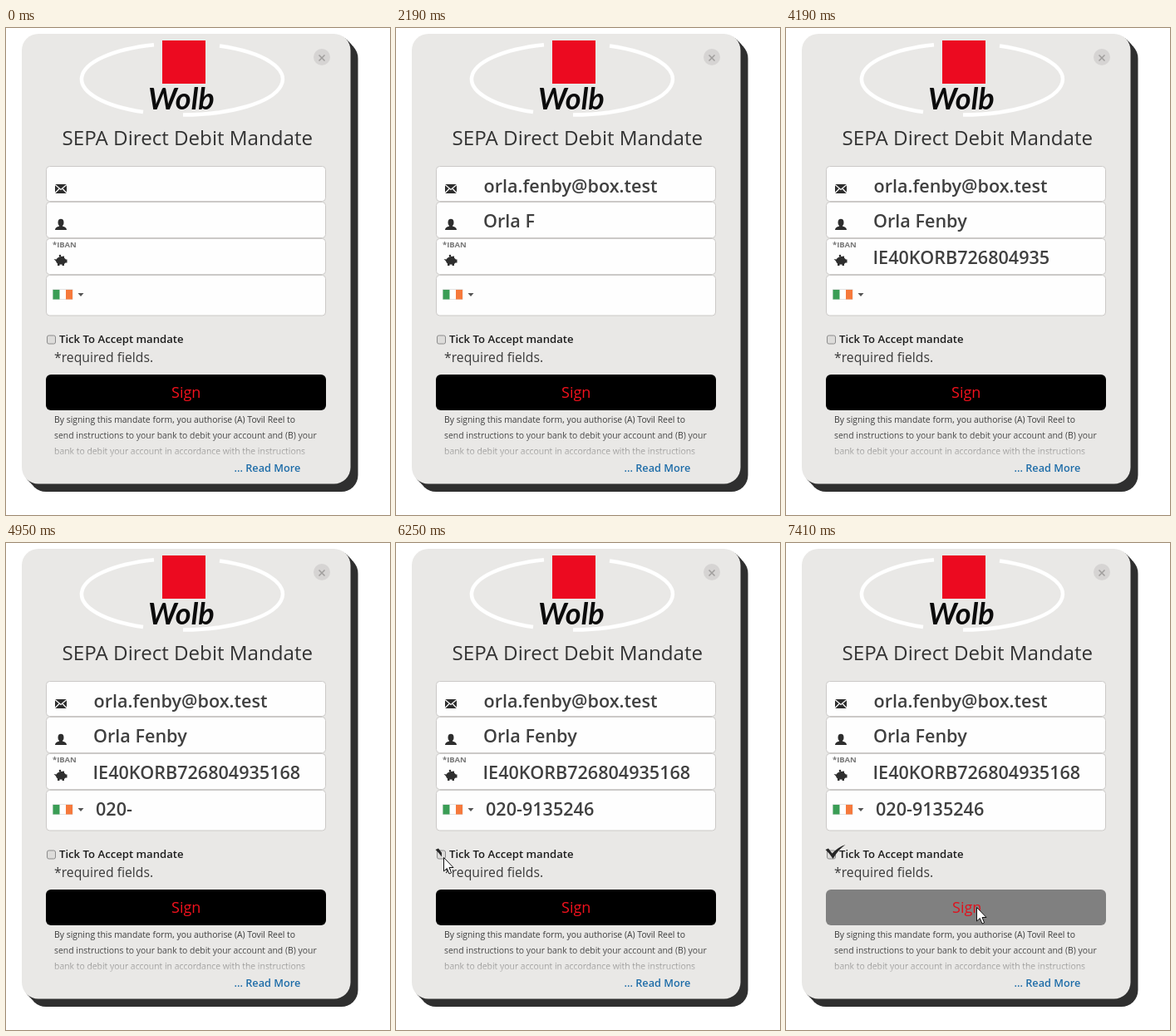
Write an HTML page that moves like this. It is 462 px wide and 586 px high and loops after 8000 ms.

```html
<!DOCTYPE html>
<html lang="en">
<head>
<meta charset="utf-8">
<title>SEPA Direct Debit Mandate</title>
<style>
  html, body { margin: 0; width: 100%; height: 100%; overflow: hidden; background: #fff; }
  svg { display: block; width: 462px; height: 586px; }
  text { font-family: "Open Sans", "Noto Sans", sans-serif; fill: #3a3a3a; }
  .title { font-size: 24.15px; fill: #333; }
  .field { fill: #fefefe; stroke: #cbc9c7; }
  .icon { fill: #2e2e2e; }
  .typed { font-size: 21.6px; font-weight: 600; fill: #404040; }
  .label { font-size: 9.5px; font-weight: 700; fill: #777; }
  .tickLabel { font-size: 13.15px; font-weight: 600; fill: #1c1c1c; }
  .note { font-size: 15.75px; }
  .sign { font-size: 18px; fill: #f3121d; }
  .terms { font-size: 10.42px; fill: #3c3c3c; }
  .more { font-size: 12.7px; font-weight: 600; fill: #1d6ca8; }
  .brand { font: italic 700 36px Lato, "Open Sans", sans-serif; fill: #0b0b0b; }
</style>
</head>
<body>
<svg viewBox="0 0 462 586">
  <defs>
    <linearGradient id="fade" x1="0" y1="0" x2="0" y2="1">
      <stop offset="0" stop-color="#e9e8e6" stop-opacity="0"/>
      <stop offset="1" stop-color="#e9e8e6"/>
    </linearGradient>
    <clipPath id="reveal"><rect id="revealBox" x="46" y="360" width="0" height="24"/></clipPath>
    <rect id="card" x="19" y="7" width="395.5" height="541.5" rx="20"/>
  </defs>

  <g fill="#2f2f2f">
    <use href="#card" x="2" y="2"/>
    <use href="#card" x="4" y="4"/>
    <use href="#card" x="6" y="6"/>
    <use href="#card" x="9" y="9.5"/>
  </g>
  <use href="#card" fill="#e9e8e6"/>

  <path d="M178 20.2A121 43 0 0 0 165 101.1M213 104.5A121 43 0 0 0 257 21.6" fill="none" stroke="#fff" stroke-width="4.5"/>
  <rect x="188" y="15" width="52" height="52" fill="#ec0a20"/>
  <text class="brand" x="171" y="98">Wolb</text>

  <circle cx="380" cy="35" r="10" fill="#d6d4d3"/>
  <path d="M376.5 32.5l7 7m0-7l-7 7" stroke="#a09e9d" stroke-width="1.5"/>

  <text class="title" x="67.5" y="140.5">SEPA Direct Debit Mandate</text>

  <g class="field">
    <rect x="48.5" y="166.5" width="336" height="42" rx="4"/>
    <rect x="48.5" y="209.5" width="336" height="43" rx="4"/>
    <rect x="48.5" y="253.5" width="336" height="43" rx="4"/>
    <rect x="48.5" y="297.5" width="336" height="48.5" rx="4"/>
  </g>

  <g class="icon">
    <rect x="59" y="188" width="14" height="11"/>
    <path d="M59 188.5l7 6 7-6M59 198.5l5-5m9 5l-5-5" fill="none" stroke="#fff" stroke-width="1.2"/>
    <ellipse cx="66" cy="234" rx="3.5" ry="4.3"/>
    <path d="M64 236h4v2.5q5 1 5 4.5H59q0-3.5 5-4.5z"/>
    <path d="M57.5 278l3 .5q2-3.5 6-3.5l3.5-.5v2l2 2h1.5v4h-2l-1.5 1.5v2h-2.500v-1.5h-3v1.5H62v-2.5q-1.5-1-2-3z"/>
    <circle cx="65" cy="274" r="1.3"/>
  </g>
  <text class="label" x="56" y="264">*IBAN</text>

  <rect x="56.5" y="314.5" width="23.5" height="12" fill="#fff" stroke="#e2e2e2"/>
  <rect x="56.5" y="315" width="8" height="11.5" fill="#3a9d55"/>
  <rect x="72" y="315" width="8" height="11.5" fill="#f6793c"/>
  <path d="M86.5 319h7l-3.5 4z" fill="#555"/>

  <text class="typed" id="mail" x="105.5" y="198"></text>
  <text class="typed" id="name" x="105" y="240"></text>
  <text class="typed" id="iban" x="104.5" y="283.5"></text>
  <text class="typed" id="phone" x="108" y="327.5"></text>

  <rect x="49.5" y="370" width="10" height="10" rx="2" fill="#dddcda" stroke="#8b8b8b"/>
  <path clip-path="url(#reveal)" d="M47.5 369l3.5-1.5 4.5 6q7-7.5 16-10.5-9.5 7-15 17-3.5-6-9-11z" fill="#262626"/>
  <text class="tickLabel" x="64" y="379">Tick To Accept mandate</text>
  <text class="note" x="58" y="402">*required fields.</text>

  <rect id="button" x="48" y="417" width="337" height="43" rx="6"/>
  <text class="sign" id="sign" x="199" y="445">Sign</text>

  <text class="terms" x="58" y="474.5">By signing this mandate form, you authorise (A) Tovil Reel to</text>
  <text class="terms" x="58" y="493.5">send instructions to your bank to debit your account and (B) your</text>
  <text class="terms" x="58" y="512.5">bank to debit your account in accordance with the instructions</text>
  <rect x="50" y="488" width="335" height="36" fill="url(#fade)"/>
  <text class="more" x="274.5" y="534">... Read More</text>

  <path id="cursor" d="M.5.5V17l3.800-3.500 2.700 6.500 2.600-1.100L7 12.500h5z" fill="#fff" stroke="#111"/>
</svg>
<script>
const LOOP = 8000;
const $ = id => document.getElementById(id);
const run = (start, n, gap = 100) => Array.from({ length: n }, (_, i) => start + i * gap);

// One time per typed character.
const fields = [
  ["mail", "orla.fenby@box.test", [...run(20, 15), ...run(1450, 4)]],
  ["name", "Orla Fenby", [...run(1832, 4, 82), ...run(2078, 6, 82)]],
  ["iban", "IE40KORB726804935168", run(2590, 20)],
  ["phone", "020-9135246", [...run(4590, 6), 5150, ...run(5250, 4)]]
];

// Time, x, y of the pointer tip.
const path = [
  [5550, 410, 517], [5650, 342, 495], [6050, 90, 392], [6150, 57, 378],
  [6450, 57, 378], [6950, 131, 443], [7350, 229, 438]
];
const tickStart = 6250, tickEnd = 6450, press = 7410;

function pointAt(t) {
  const i = path.findIndex(p => p[0] > t);
  if (i < 0) return path[path.length - 1].slice(1);
  const [t0, x0, y0] = path[i - 1], [t1, x1, y1] = path[i];
  const k = (t - t0) / (t1 - t0);
  return [x0 + (x1 - x0) * k, y0 + (y1 - y0) * k];
}

function draw(t) {
  for (const [id, text, times] of fields) {
    const shown = text.slice(0, times.filter(s => s <= t).length);
    if ($(id).textContent !== shown) $(id).textContent = shown;
  }

  const step = Math.floor((t - 50) / 100) * 100 + 50;
  const visible = step >= path[0][0];
  $("cursor").setAttribute("visibility", visible ? "visible" : "hidden");
  if (visible) {
    const [x, y] = pointAt(step).map(Math.round);
    $("cursor").setAttribute("transform", `translate(${x} ${y})`);
  }

  const grown = (step - tickStart + 100) / (tickEnd - tickStart + 100);
  $("revealBox").setAttribute("width", 27 * Math.max(0, Math.min(1, grown)));

  const down = t >= press;
  $("button").setAttribute("fill", down ? "#808080" : "#000");
  $("sign").setAttribute("x", down ? 200 : 199);
  $("sign").style.fill = down ? "#e0101c" : "";
}

const begin = performance.now();
function tick() {
  draw((performance.now() - begin) % LOOP);
  requestAnimationFrame(tick);
}
tick();
</script>
</body>
</html>
```
